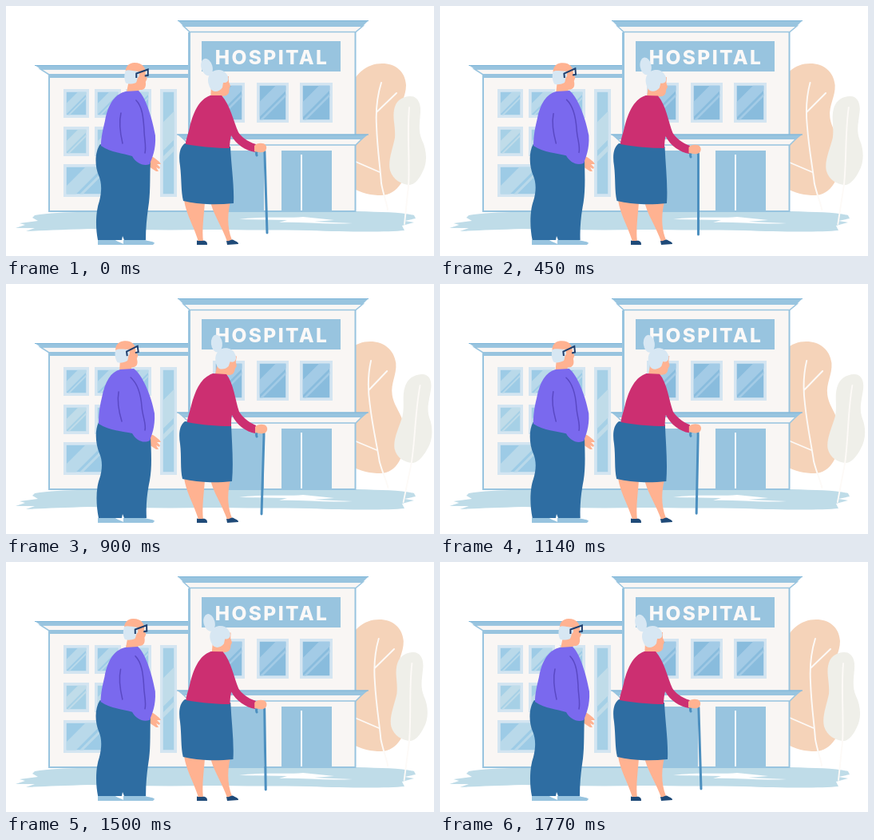
Write an HTML page that moves like this. It is 536 px wide and 313 px high and loops after 1.8 s.

```html
<!DOCTYPE html>
<html lang="en">
<head>
<meta charset="utf-8">
<title>Hospital visit</title>
<style>
  html, body { margin: 0; width: 100%; height: 100%; overflow: hidden; background: #fff; }
  #stage { display: block; width: 100vw; height: 100vh; }
  .blue { fill: #98c4df; }
  .wall { fill: #f9f6f4; stroke: #98c4df; stroke-width: 2; }
  .slope { fill: #f9f6f4; stroke: #98c4df; stroke-width: 1.5; }
  .edge { fill: none; stroke: #7db5d8; stroke-width: 1; }
  .skin { fill: #ffb291; }
  .hair { fill: #d7e7f3; }
  .denim { fill: #2e6da2; }
  .navy { fill: #1f4a78; }
  .vein { fill: none; stroke: #fdfaf7; stroke-width: 1.9; stroke-linecap: round; stroke-linejoin: round; }
  .fold { fill: none; stroke: #5a49c4; stroke-width: 1.5; stroke-linecap: round; }
  .sign { font: 800 24.5px Inter, Lato, sans-serif; letter-spacing: 2.4px; fill: #fbf9f8; }
</style>
</head>
<body>
<svg id="stage" viewBox="0 0 536 313" preserveAspectRatio="none">
  <!-- ground -->
  <path fill="#bfdce8" d="M36 262 C70 256 120 259 180 257 H440 C470 258 494 258 511 262 L513 266 L499 269 L511 271 L496 275 L499 281 C480 283 430 283 380 281 C340 280 300 281 250 280 C200 281 150 280 104 279 C70 280 45 281 25 282 L36 278 L12 278 L24 274 L17 272 L40 269 L33 265 Z"/>
  <path fill="#fff" d="M292 267 C320 263 350 266 372 264 L411 268 L386 270 L434 272 C400 274 370 270 342 271 L352 268 Z"/>

  <g id="bigTree">
    <path fill="#f5d3b9" d="M471 72 C488 72 500 82 501 99 C501 114 492 124 493 139 C494 155 506 165 505 185 C504 215 490 237 470 237 C458 237 446 235 430 226 V110 C434 85 452 72 471 72 Z"/>
    <path class="vein" d="M470 96 C465 112 463 132 464 150 C465 180 469 205 470 222 C473 238 477 247 478 255 M489 109 L464 133 M438 195 L468 208"/>
  </g>
  <g id="smallTree">
    <path fill="#efefe9" d="M505 113 C514 112 520 120 519 133 C518 148 516 156 521 168 C527 180 528 196 522 207 C517 218 511 224 505 224 C495 223 485 218 481 206 C478 194 484 180 487 165 C488 150 484 142 486 130 C488 119 495 114 505 113 Z"/>
    <path class="vein" stroke-width="1" d="M505 127 C502 160 506 195 504 225 L499 273"/>
  </g>

  <!-- low wing -->
  <rect class="wall" x="54" y="85" width="176" height="172"/>
  <path class="slope" d="M43 79 H230 V86 H54 Z"/>
  <path class="blue" d="M36 74 H230 V79.5 H44 Z M54 85 H230 V90 H54 Z"/>
  <path class="edge" d="M36 74.5 H230"/>

  <!-- main block -->
  <rect class="wall" x="230" y="30" width="207.5" height="227"/>
  <path class="blue" d="M228 33 H231 V162 H228 Z"/>
  <path class="slope" d="M222 25 H447 L438 32.5 H230 Z"/>
  <path class="blue" d="M215 18 H454 L446 26 H223 Z"/>
  <path class="edge" d="M215 18.5 H454"/>
  <rect class="blue" x="245" y="44" width="174" height="38"/>
  <text class="sign" x="333" y="73" text-anchor="middle">HOSPITAL</text>
  <path class="slope" d="M222 166 H446 L438 174 H230 Z"/>
  <path class="blue" d="M214 160.5 H454 L446 167 H222 Z"/>
  <path class="edge" d="M214 161 H454"/>
  <path class="blue" d="M260 181 H323 V257 H260 Z M345 181 H408 V257 H345 Z"/>
  <path stroke="#fff" stroke-width="1.8" d="M370 186 V256"/>
  <g id="windows"></g>

  <!-- man -->
  <path class="skin" d="M176 188 L184 189 C188 192 192 194 194 198 L189 198 L193 202 L192 204 L188 202 L191 207 L188 207 L182 203 C179 201 177 199 176 197 Z"/>
  <path class="blue" d="M115 299 V293 H137 C139 295 144 296 147 298 V293 H174 C178 295 185 294 186 297 L184 299 Z"/>
  <path class="denim" id="pants"/>
  <g id="manHead">
    <path class="skin" d="M154 94 L150 114 H164 L167 105 C174 106 176 101 175 95 L177 91 L175 86 C176 78 172 71 161 71 C154 71 150 76 150 82 Z"/>
    <path class="hair" d="M150 81 C153 79 158 81 167 82 L167 88 C164 90 165 93 163 96 C158 98 152 98 150 96 C148 91 148 86 150 81 Z"/>
    <path fill="none" stroke="#1f3f6e" stroke-width="2" d="M163.500 90 V84.500 L178 79.500 V87 L174 87.500"/>
  </g>
  <path fill="#7a69ee" id="jumper"/>
  <path class="fold" id="folds"/>

  <!-- woman -->
  <path class="skin" d="M223 243 C226 262 235 275 241 295 H247 C245 280 248 262 249 245 Z M256 245 C260 262 270 275 277 295 L283 293 C277 278 277 262 281 245 Z"/>
  <path class="navy" d="M239 299 L239 293.500 C243 295 247 293 249 294 C252 295 252 297 252 299 Z M277 299 L276 294 C280 295 283 291 285 293 C288 295 291 295 291 298 Z"/>
  <path class="denim" id="skirt"/>
  <g id="womanHead">
    <ellipse class="hair" cx="251.500" cy="76.500" rx="7" ry="11" transform="rotate(-16 251.500 76.500)"/>
    <path class="skin" d="M257 100 L256 119 H270 V113 C277 113 280 110 279.500 104 L281 100 L279 95 V88 H266 Z"/>
    <path class="hair" d="M254 88 C257 79 271 77 276 85 C281 91 278 97 272 96 L271 102 C267 108 259 109 256 103 C253 98 252 92 254 88 Z"/>
  </g>
  <path fill="#cc2f71" id="blouse"/>
  <path id="cane" fill="none" stroke="#4c8fbf" stroke-width="3" stroke-linecap="round" stroke-linejoin="round"/>
  <path class="skin" id="grip" d="M311 175 C314 171 323 171 325 174 C328 178 325 183 321 183 C317 184 314 182 311 182 Z"/>
</svg>
<script>
const LOOP = 1800, STEP = 30;
const $ = id => document.getElementById(id);

// Glass panes: x, y, width, height, tone
const tones = { pale: ['#a6d0e6', '#c0dce9'], mid: ['#9dcbe6', '#b9d9ea'], deep: ['#89bcdd', '#a3cbe6'] };
const panes = [
  [72, 104, 32, 36, 'mid'], [111, 104, 33, 36, 'mid'], [150, 104, 32, 36, 'mid'],
  [72, 151, 32, 37, 'pale'], [111, 151, 33, 37, 'pale'], [150, 151, 32, 37, 'pale'],
  [72, 198, 62, 41, 'mid'], [193, 104, 21, 135, 'pale'],
  [259, 96, 40, 50, 'deep'], [314, 96, 40, 50, 'deep'], [368, 96, 41, 50, 'deep']
];

// One wide and one narrow diagonal shine across the glass.
function pane([x, y, w, h, tone]) {
  const [glass, shine] = tones[tone];
  const iw = w - 7, ih = h - 7, span = iw + ih;
  const band = (a, b) => `M0 ${a * span} L${a * span} 0 H${b * span} L0 ${b * span} Z`;
  return `<rect x="${x}" y="${y}" width="${w}" height="${h}" fill="#d4e5f1"/>
    <svg x="${x + 3.5}" y="${y + 3.5}" width="${iw}" height="${ih}">
      <rect width="${iw}" height="${ih}" fill="${glass}"/>
      <path d="${band(0.27, 0.52)}${band(0.57, 0.62)}" fill="${shine}"/>
    </svg>`;
}
$('windows').innerHTML = panes.map(pane).join('');

// Blend two path strings that share the same commands.
function morph(id, from, to) {
  const ends = to.match(/-?[\d.]+/g).map(Number);
  return p => {
    let i = 0;
    $(id).setAttribute('d', from.replace(/-?[\d.]+/g, n => +n + (ends[i++] - n) * p));
  };
}

const place = (id, value) => $(id).setAttribute('transform', value);

// Horizontal shear that leaves the line y = base in place.
const sway = (id, k, base) => place(id, `matrix(1 0 ${k} 1 ${-k * base} 0)`);

const manParts = [
  morph('jumper',
    'M150 107 C137 110 128 122 124 144 C120 160 119 168 119 175 C132 184 146 184 158 188 C163 197 172 201 180 198 C183 190 188 180 187 162 C183 140 175 114 166 106 Z',
    'M143 107 C131 110 124 122 120 142 C116 158 116 168 116 175 C130 184 146 184 158 187 C163 196 172 200 180 196 C182 190 187 180 186 162 C182 140 171 114 160 106 Z'),
  morph('folds',
    'M163 118 C171 126 172 140 173 154 C173 166 176 176 174 184 M144 134 C141 147 143 159 146 172',
    'M156 117 C165 125 169 140 170 154 C171 166 176 176 174 183 M141 135 C139 147 141 159 145 172'),
  morph('pants',
    'M118 173 C111 183 111 200 116 212 C120 221 120 232 117 244 C112 258 112 278 115 293 H145 L146 288 L148 293 H175 C175 275 177 260 179 246 C181 230 180 210 181 194 Z',
    'M116 173 C111 183 112 200 117 212 C121 221 121 232 117 244 C112 258 113 278 116 293 H145 L146 288 L148 293 H176 C175 275 177 260 180 246 C183 230 182 210 181 192 Z')
];

const womanParts = [
  morph('blouse',
    'M256 112 C241 117 234 135 230 152 C227 164 225 168 225 173 C242 176 262 178 280 178 C280 172 281 166 282 162 C288 173 300 181 312 183 L313 173 C302 170 294 163 291 158 C285 145 281 124 270 112 Z',
    'M259 112 C244 117 237 133 232 152 C229 164 227 168 227 173 C243 176 262 178 282 178 C282 173 282 168 283 164 C289 177 301 185 312 187 L313 177 C303 173 296 166 292 160 C287 145 285 124 276 113 Z'),
  morph('skirt',
    'M224 172 C217 177 216 188 218 200 C220 216 219 232 222 244 C242 249 264 249 285 247 C286 224 282 200 281 176 Z',
    'M224 172 C217 177 216 188 218 200 C220 216 218 232 221 244 C242 249 264 249 283 247 C285 224 283 200 282 176 Z'),
  morph('cane',
    'M314 187 C312 181 317 179 321 179 C324 179 324 182 324 186 L327 284',
    'M314 191 C312 185 317 183 320 183 C323 183 323 186 323 190 L320 288')
];

const wave = t => (1 - Math.cos(2 * Math.PI * t / LOOP)) / 2;

function draw(t) {
  const p = wave(t), m = wave(t + 80);
  sway('bigTree', 0.084 * p, 250);
  sway('smallTree', -0.102 * p, 260);
  manParts.forEach(set => set(m));
  womanParts.forEach(set => set(p));
  place('manHead', `translate(${-10 * m} 0) rotate(${-8 * m} 163 104)`);
  place('womanHead', `translate(${6 * p} 0) rotate(${10 * p} 266 112)`);
  place('grip', `translate(${p} ${4 * p})`);
}

const start = performance.now();
function tick() {
  const t = (performance.now() - start) % LOOP;
  draw(Math.floor(t / STEP) * STEP);
  requestAnimationFrame(tick);
}
draw(0);
requestAnimationFrame(tick);
</script>
</body>
</html>
```
